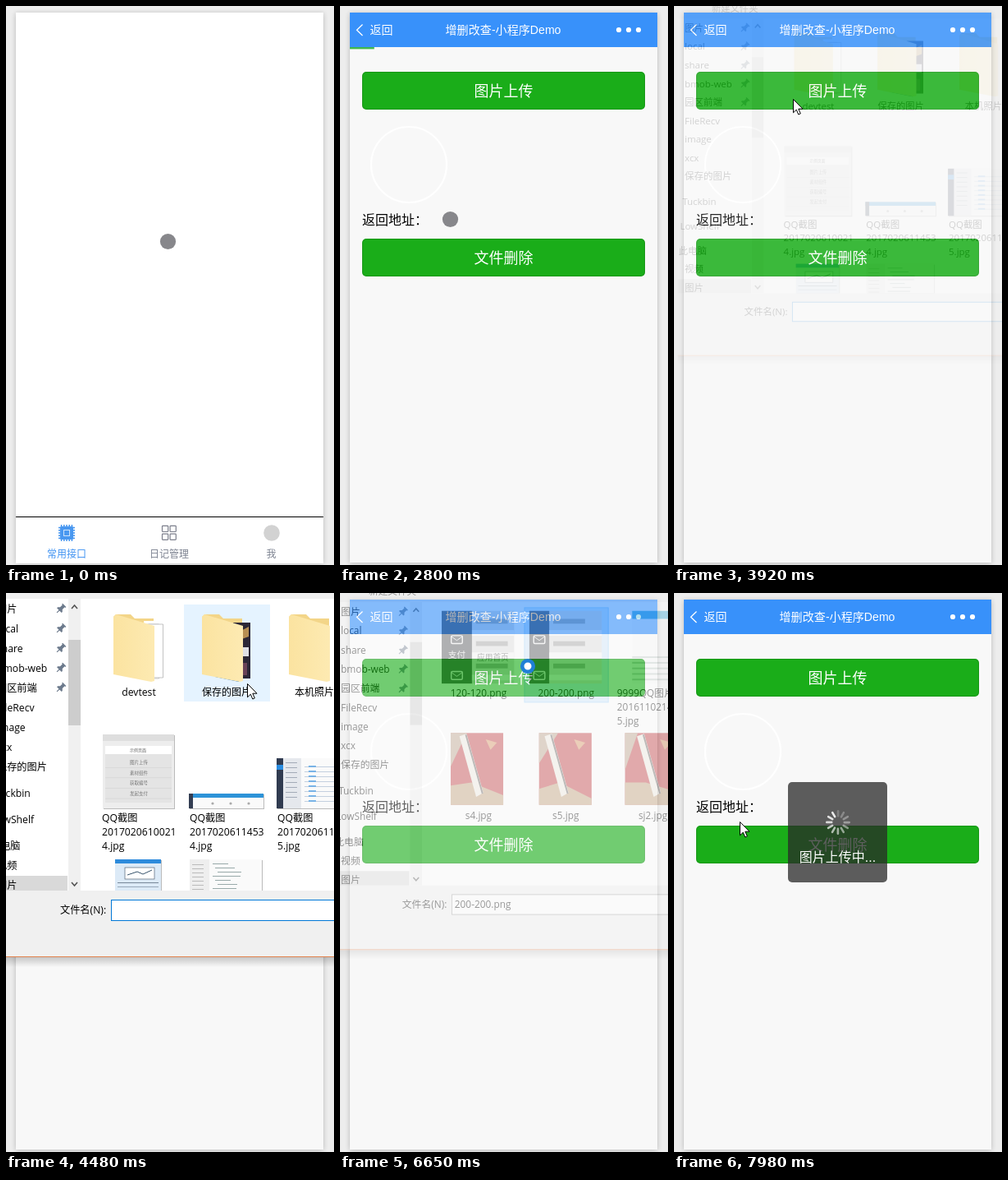
Write an HTML page that moves like this. It is 400 by 680 pixels and loops after 8 s.

```html
<!DOCTYPE html>
<html lang="zh-CN">
<head>
<meta charset="utf-8">
<title>图片上传</title>
<style>
html, body { margin: 0; width: 100%; height: 100%; overflow: hidden; background: #ededed; }
svg { display: block; width: 400px; height: 680px; }
text { font-family: "Liberation Sans", "Noto Sans CJK SC", "Noto Sans CJK", sans-serif; white-space: pre; }
#dialog text { font-family: "Open Sans", "Noto Sans CJK SC", "Noto Sans CJK", sans-serif; }
</style>
</head>
<body>
<svg id="stage" viewBox="0 0 400 680" xmlns="http://www.w3.org/2000/svg">
  <defs>
    <filter id="soft" x="-10%" y="-10%" width="120%" height="120%"><feGaussianBlur stdDeviation="3"/></filter>
    <linearGradient id="fall" x2="0" y2="1">
      <stop offset="0" stop-color="#000" stop-opacity=".2"/><stop offset="1" stop-color="#000" stop-opacity="0"/>
    </linearGradient>
    <linearGradient id="fold" x2="1" y2="0">
      <stop offset="0" stop-color="#fbe3a0"/><stop offset="1" stop-color="#fdeab2"/>
    </linearGradient>
    <clipPath id="files"><rect x="91" y="7" width="340" height="355"/></clipPath>
  </defs>
  <rect width="400" height="680" fill="#ededed"/>
  <rect x="12" y="9" width="375" height="669" fill="#000" opacity=".22" filter="url(#soft)"/>
  <rect id="paper" x="12" y="8" width="375" height="670" fill="#fff"/>
  <g id="tabs"></g>
  <g id="page"></g>
  <g id="head"></g>
  <rect id="bar" x="12" y="50" height="2.4" fill="#3fb84f"/>
  <g id="toast"></g>
  <g id="dialog"></g>
  <circle id="dot" r="9.6" fill="#87878b"/>
  <path id="arrow" d="M.5 .5V16.8L4.3 13.2L6.8 19L9.3 17.9L6.8 12.2H12Z" fill="#fff" stroke="#000" stroke-width="1"/>
  <circle id="ring" r="6.8" fill="#fff" stroke="#1f7fd6" stroke-width="4.6"/>
</svg>
<script>
const LOOP = 8000, STEP = 70;
const $ = id => document.getElementById(id);
const rect = (x, y, w, h, fill, more = '') =>
  `<rect x="${x}" y="${y}" width="${w}" height="${h}" fill="${fill}" ${more}/>`;
const line = (d, color, w = 1) => `<path d="${d}" fill="none" stroke="${color}" stroke-width="${w}"/>`;
const text = (x, y, s, size, fill = '#000', anchor = 'start', more = '') =>
  `<text x="${x}" y="${y}" font-size="${size}" fill="${fill}" text-anchor="${anchor}" ${more}>${s}</text>`;
const shape = (d, fill) => `<path d="${d}" fill="${fill}"/>`;
const times = (n, fn) => Array.from({ length: n }, (_, i) => fn(i)).join('');

function drawTabs() {
  const blue = '#4a98f0', gray = '#7c7f8c';
  const pins = times(5, i => {
    const p = 3.2 * i - 7.2;
    return rect(74 + p, 631, 1.6, 20, blue) + rect(64, 641 + p, 20, 1.6, blue);
  });
  const cells = times(4, i => rect(190.5 + 9.6 * (i % 2), 632.3 + 9.8 * (i >> 1), 7.2, 7.2,
    'none', `rx=".8" stroke="${gray}" stroke-width="1.2"`));
  return rect(12, 621, 375, 1, '#000') + pins +
    rect(66, 633, 16, 16, blue, 'rx="1.5"') +
    rect(70.5, 637.5, 7, 7, 'none', 'stroke="#cfe4fb"') + cells +
    '<circle cx="324" cy="641" r="9.8" fill="#d2d2d2"/>' +
    text(74, 671, '常用接口', 12, '#3f92f2', 'middle') +
    text(199, 671, '日记管理', 12, '#7c8290', 'middle') +
    text(323.5, 671, '我', 12, '#7c8290', 'middle');
}

function drawHead() {
  return rect(12, 8, 375, 42, '#3891fa') +
    line('M27.5 22.5L20.5 29.3L27.5 36', '#fff', 1.3) +
    text(36.5, 34.2, '返回', 14, '#fff', 'start', 'font-weight="500"') +
    text(199, 34.2, '增删改查-小程序Demo', 14.1, '#fff', 'middle') +
    times(3, i => `<circle cx="${340 + 12 * i}" cy="29" r="3.1" fill="#fff"/>`);
}

function drawPage() {
  const button = (y, label, id) =>
    rect(27, y, 345, 46, '#1aad19', `id="${id}" rx="5"`) +
    rect(27.5, y + .5, 344, 45, 'none', 'rx="5" stroke="#000" stroke-opacity=".13"') +
    text(199.5, y + 29.5, label, 18, '#fff', 'middle', 'font-weight="300"');
  return button(80, '图片上传', 'upload') +
    '<circle cx="84" cy="193" r="46" fill="none" stroke="#fff" stroke-width="2.2"/>' +
    text(27, 266, '返回地址：', 16) + button(283, '文件删除', 'remove');
}

function drawToast() {
  const blades = times(12, i =>
    `<rect x="198.8" y="264" width="2.6" height="8.5" rx="1.3" fill="#fff" transform="rotate(${30 * i} 200 279)"
      opacity="${.22 + .66 * i / 11}"/>`);
  return rect(139, 230, 121, 122, '#282828', 'rx="5" opacity=".75"') +
    `<g id="spin">${blades}</g>` +
    text(199.5, 327, '图片上传中...', 16, '#fff', 'middle');
}

function folder(x, inside) {
  return shape(`M${x} 29l3-3h18l5 5h23v68h-49z`, '#f3d588') + inside +
    shape(`M${x} 29l3-3l47 14v67l-4 1l-46-9z`, 'url(#fold)');
}

function labels(x, y, rows) {
  return rows.map((s, i) => text(x, y + 17.4 * i, s, 12.2)).join('');
}

function drawPictures() {
  const thumb = (x, y, w, h, fill = '#fafafa') =>
    rect(x + 1, y + 1, w, h, '#bbb') + rect(x, y, w, h, fill);
  const shot = thumb(118, 172, 87, 90, '#ededed') + rect(118, 172, 87, 8, '#dedede') +
    rect(121, 186, 81, 69, '#e4e4e4') + rect(121, 186, 81, 10, '#fff') +
    text(161, 193, '示例页面', 5, '#666', 'middle') +
    ['图片上传', '素材组件', '获取编号', '发起支付'].map((s, i) =>
      text(162, 208 + 12.6 * i, s, 5.5, '#777', 'middle') +
      rect(121, 212 + 12.6 * i, 81, .5, '#ccc')).join('');
  const strip = thumb(223, 244, 91, 18) + rect(223, 244, 91, 5, '#2d93d8') + rect(223, 244, 5, 18, '#333d52') +
    times(3, i => `<circle cx="${252 + 22 * i}" cy="256" r="1.6" fill="#aaa"/>`);
  const table = thumb(330, 201, 75, 61) + rect(330, 201, 8, 61, '#303b50') + rect(330, 209, 8, 6, '#2a8ce0') +
    rect(338, 201, 22, 61, '#e5e8ed') + times(8, i => rect(341, 206 + 6 * i, 14, 1, '#a3abb8') +
      rect(364, 211 + 6 * i, 40, 1, '#c4d0df') + rect(369, 210 + 6 * i, 9, 2, '#79b3e6'));
  const chart = thumb(133, 324, 56, 40, '#dceaf7') + rect(133, 324, 56, 5, '#2d8bdc') +
    rect(145, 334, 36, 14, '#fff', 'stroke="#567" stroke-width=".7"') +
    line('M148 343L160 339L167 342L178 337', '#38556d') + rect(136, 352, 50, 1, '#789') + rect(136, 357, 50, 1, '#9ab');
  const code = thumb(224, 324, 88, 40) + rect(224, 324, 24, 40, '#eee') +
    times(7, i => rect(227, 330 + 5 * i, 14, 1, '#bbb') + rect(252 + 3 * (i % 3), 329 + 5 * i, 19 + 5 * (i % 4), 1, '#9aa'));
  const sheets = shape('M168 34h20v70h-20z', '#fff') + line('M168.5 38h18v66h-18z', '#bbb', .7) +
    shape('M173 38h19v65h-19z', '#fff') + line('M173.5 38h18v65h-18z', '#aaa', .7) + rect(149, 48, 26, 47, '#1677bd');
  const photos = shape('M255 41l29-4v71l-29-6z', '#1767bf') + shape('M277 36h21v68h-21z', '#2c2736') +
    shape('M279 50l17-9v12l-17 6z', '#b78f53') + shape('M281 66h15v11h-15z', '#dfdfe4') + shape('M281 85h13v15h-13z', '#6a4357') +
    text(257, 73, '解决方案', 6.5, '#fff') + rect(258, 80, 17, 1, '#83b8e8');
  return rect(110, 14, 105, 118, '#e5f3ff', 'id="hover"') +
    folder(131, sheets) + folder(239, photos) + folder(345, '') +
    text(162, 125, 'devtest', 12.2, '#000', 'middle') + text(269, 125, '保存的图片', 12, '#000', 'middle') +
    text(376, 125, '本机照片', 12, '#000', 'middle') + shot + strip + table + chart + code +
    labels(117, 277.5, ['QQ截图', '2017020610021', '4.jpg']) +
    labels(224, 277.5, ['QQ截图', '2017020611453', '4.jpg']) +
    labels(331, 277.5, ['QQ截图', '2017020611460', '5.jpg']);
}

function drawSaved() {
  const menu = (x, side) => rect(x, 18, 91, 91, '#dcdcdc') + rect(x, 18, side, 91, '#3b3d42') +
    times(3, i => rect(x + side + 5, 28 + 28 * i, 40, 6, '#999') + rect(x + side, 42 + 28 * i, 91 - side, 7, '#f8f8f8')) +
    times(2, i => rect(x + side / 2 - 7, 49 + 45 * i, 14, 10, 'none', 'rx="1.5" stroke="#eee" stroke-width="1.5"') +
      line(`M${x + side / 2 - 7} ${50 + 45 * i}l7 5l7-5`, '#eee'));
  const photo = (x, tilt) => `<g transform="translate(${x} 171)">` +
    rect(0, 0, 66, 90, '#bd2c30') + shape(`M0 0h${24 - tilt}L0 ${38 + tilt}z`, '#b89c82') +
    shape(`M0 90V${70 - tilt}L26 62L66 ${82 - tilt}V90z`, '#bd9870') +
    shape(`M${7 + tilt} 4l9-3L${37 + tilt} 75l-9 5z`, '#eee9df') +
    line(`M${15 + tilt} 2L${36 + tilt} 76`, '#5c5552', 2) + shape('M44 8l14 4l-8 9z', '#d78b55') + '</g>';
  return rect(219.7, 14, 105.3, 118.5, '#cce8ff', 'id="pick" stroke="#99d1ff"') + menu(115.7, 38) + menu(225.8, 25) +
    text(134.7, 77, '支付', 11, '#eee', 'middle') + text(160, 80, '应用首页', 10, '#555') +
    rect(355, 18, 70, 91, '#fafafa') + rect(355, 18, 70, 10, '#36a9d6') +
    times(5, i => rect(355, 75 + 7 * i, 50, 2, '#bcc9c4')) +
    text(162, 125.4, '120-120.png', 12.2, '#000', 'middle') +
    text(272, 125.4, '200-200.png', 12.2, '#000', 'middle') +
    labels(336, 125.4, ['9999QQ图片', '2016110214230', '5.jpg']) +
    photo(127, 4) + photo(238, 0) + photo(346, 8) +
    ['s4.jpg', 's5.jpg', 'sj2.jpg'].map((s, i) => text(162 + 109.5 * i, 278.5, s, 12.2, '#000', 'middle')).join('');
}

function drawDialog() {
  const rows = ['图片', 'local', 'share', 'bmob-web', '园区前端', 'FileRecv', 'image', 'xcx', '保存的图片'];
  const side = rows.map((s, i) => text(-11, 23.5 + 24 * i, s, 12.2)).join('') +
    text(-14, 248, 'Tuckbin', 12.2) + text(-17, 280, 'LowShelf', 12.2) + text(-19, 311.5, '此电脑', 12.2) +
    text(-11, 335.5, '视频', 12.2) + text(-11, 359.5, '图片', 12.2);
  const pins = times(5, i => `<g transform="translate(67 ${19 + 24 * i}) rotate(45)">` +
    shape('M-3-6h6v1.5h-1v4l2 2v1.5h-8v-1.5l2-2v-4h-1zM-.6 3h1.2v4h-1.2z', '#6c7a8c') + '</g>');
  return rect(-20, 443, 440, 12, 'url(#fall)') + rect(-20, -60, 440, 503, '#f0f0f0') +
    text(24, -2, '新建文件夹', 12) + rect(-20, 7, 440, 355, '#fff') + rect(-20, 344, 95, 18, '#d9d9d9') +
    side + pins + rect(76, 7, 15, 355, '#f0f0f0') + rect(76, 57, 15, 104, '#cdcdcd') +
    line('M80 19l3.5-4l3.5 4M80 352l3.5 4l3.5-4', '#555', 1.6) +
    `<g clip-path="url(#files)"><g id="pictures">${drawPictures()}</g><g id="saved">${drawSaved()}</g></g>` +
    text(66, 390, '文件名(N):', 12.2) +
    rect(128.5, 373.5, 300, 25, '#fff', 'id="field"') + text(132, 390.3, '200-200.png', 12.2, '#000', 'start', 'id="name"') +
    rect(-20, 442, 440, 1, '#e2834f');
}

const parts = { tabs: drawTabs, head: drawHead, page: drawPage, toast: drawToast, dialog: drawDialog };
for (const id in parts) $(id).innerHTML = parts[id]();

// Pointer stops: time, x, y
const stops = [
  [0, 197.5, 286.5], [210, 201.5, 259.5], [1190, 201.5, 259.5], [1260, 173, 261], [1400, 173, 261],
  [1960, 150, 402], [2380, 150, 402], [2730, 134.5, 259.5], [2870, 134.5, 259.5], [3220, 134.5, 136.5],
  [3290, 145, 108.5], [3360, 145, 108.5], [3430, 145, 119], [3640, 145, 119], [3710, 145, 113], [4130, 145, 113],
  [4480, 294, 110], [4550, 294, 110], [4620, 286, 110], [4690, 286, 110], [5040, 350, 92], [5320, 275, 104],
  [5740, 275, 104], [5950, 228, 90], [6160, 228, 90], [6230, 228, 89], [6860, 228, 89],
  [7420, 104, 248], [7770, 80, 278], [8000, 80, 278]
];

function pointer(t) {
  const i = Math.max(1, stops.findIndex(s => s[0] >= t));
  const [a, b] = [stops[i - 1], stops[i]];
  const k = (t - a[0]) / (b[0] - a[0]);
  return [a[1] + (b[1] - a[1]) * k, a[2] + (b[2] - a[2]) * k];
}

const clamp = v => Math.min(1, Math.max(0, v));
const within = (t, a, b) => t >= a && t < b;
const show = (id, on) => $(id).setAttribute('display', on ? 'inline' : 'none');
const set = (id, name, value) => $(id).setAttribute(name, value);

function draw(time) {
  const t = Math.floor(time / STEP) * STEP;
  const [x, y] = pointer(t);

  const enter = clamp((t - 350) / 280);
  set('tabs', 'opacity', 1 - enter);
  set('head', 'opacity', enter);
  const loaded = t >= 1540;
  set('paper', 'fill', loaded ? '#f8f8f8' : '#fff');
  set('paper', 'height', t < 700 ? 670 : loaded ? 669 : 668);
  show('page', loaded);
  set('upload', 'fill', within(t, 3430, 3710) ? '#179b16' : '#1aad19');

  const start = t < 2000 ? 795 : 2745;
  show('bar', within(t, 795, 1610) || within(t, 2745, 3220));
  set('bar', 'width', Math.min(375, Math.max(0, (t - start) * .541)));

  // The file window grows and fades around a point on the right edge
  const away = t < 5000 ? Math.max(0, (4060 - t) / STEP) : Math.max(0, (t - 6580) / STEP);
  const scale = 1 - .0293 * away;
  show('dialog', within(t, 3850, 6860));
  set('dialog', 'opacity', Math.pow(.38, away));
  set('dialog', 'transform', `translate(400 147) scale(${scale}) translate(-400 -147)`);
  const inside = t >= 5460;
  show('pictures', !inside);
  show('saved', inside);
  const column = Math.floor((x - 110) / 107);
  show('hover', t >= 4200 && column >= 0 && column < 3);
  set('hover', 'x', 110 + 107 * column);
  show('pick', t >= 5810);
  set('pick', 'fill', t >= 6440 ? '#cce8ff' : '#e5f3ff');
  set('pick', 'stroke', t >= 6440 ? '#99d1ff' : 'none');
  show('name', t >= 6440);
  set('field', 'stroke', t < 4760 ? '#0078d7' : '#a0a0a0');

  show('toast', t >= 6790);
  set('spin', 'transform', `rotate(${30 * Math.floor((t - 7980) / 83.3)} 200 279)`);

  const touch = t < 1260 || within(t, 1960, 3710);
  const busy = within(t, 6580, 6930);
  show('dot', touch);
  show('ring', busy);
  show('arrow', !touch && !busy);
  set('dot', 'transform', `translate(${x} ${y})`);
  set('ring', 'transform', `translate(${x + 1} ${y})`);
  set('arrow', 'transform', `translate(${x} ${y})`);
}

const begin = performance.now();
function tick() {
  draw((performance.now() - begin) % LOOP);
  requestAnimationFrame(tick);
}
tick();
</script>
</body>
</html>
```
